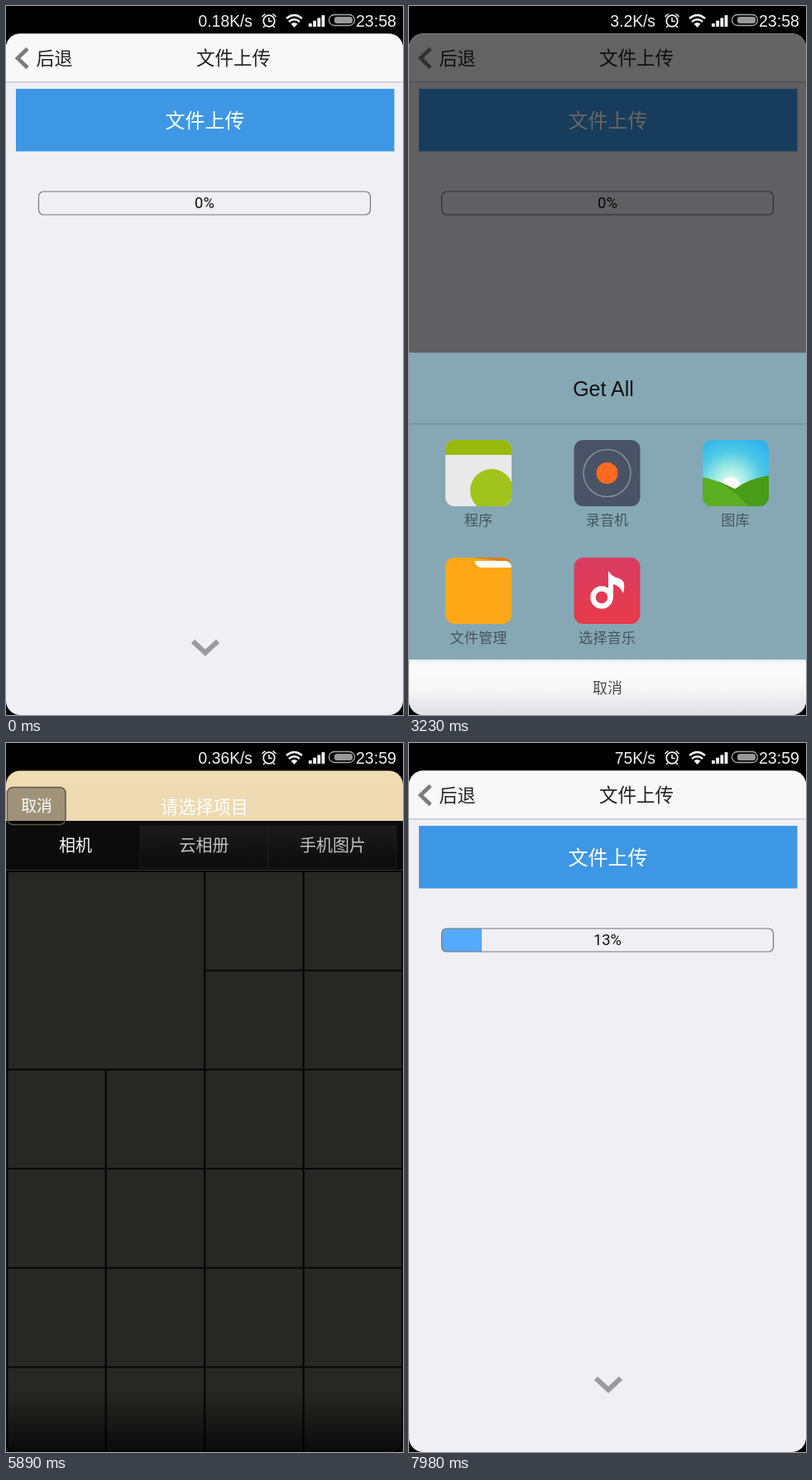
An HTML page that plays this animation: 480 px wide and 856 px high, repeating every 8000 ms.

```html
<!DOCTYPE html>
<html lang="zh">
<head>
<meta charset="utf-8">
<title>文件上传</title>
<style>
  html, body { margin: 0; width: 100%; height: 100%; overflow: hidden; background: #000; }
  svg { display: block; width: 100%; height: 100%; }
  text { font-family: "Liberation Sans", "Noto Sans CJK SC", "Noto Sans CJK", sans-serif; }
  .pct { font-family: Roboto, sans-serif; }
  .tab { font-family: "Noto Sans CJK SC", "Noto Sans CJK", sans-serif; font-weight: 500; }
</style>
</head>
<body>
<svg id="stage" viewBox="0 0 480 856"></svg>
<script>
const LOOP = 8000, STEP = 190;

const attrs = o => Object.entries(o).map(([k, v]) => `${k}="${v}"`).join(' ');
const rect = (x, y, w, h, fill, extra = {}) =>
  `<rect ${attrs({ x, y, width: w, height: h, fill, ...extra })}/>`;
const circle = (cx, cy, r, fill, extra = {}) => `<circle ${attrs({ cx, cy, r, fill, ...extra })}/>`;
const path = (d, fill, extra = {}) => `<path ${attrs({ d, fill, ...extra })}/>`;
const line = (d, stroke, width, extra = {}) =>
  path(d, 'none', { stroke, 'stroke-width': width, ...extra });
// Text placed by its middle height
const text = (s, x, cy, size, fill, extra = {}) =>
  `<text ${attrs({ x, y: cy + size * 0.37, 'font-size': size, fill, 'text-anchor': 'middle', ...extra })}>${s}</text>`;
const group = (id, body, extra = {}) => `<g ${attrs({ id, ...extra })}>${body}</g>`;
const stops = list => list.map(([o, c, a = 1]) =>
  `<stop offset="${o}" stop-color="${c}" stop-opacity="${a}"/>`).join('');
const gradient = (id, list) =>
  `<linearGradient id="${id}" x1="0" y1="0" x2="0" y2="1">${stops(list)}</linearGradient>`;
const glow = (id, cx, cy, r, list) =>
  `<radialGradient id="${id}" gradientUnits="userSpaceOnUse" ${attrs({ cx, cy, r })}>${stops(list)}</radialGradient>`;
const clip = (id, shape) => `<clipPath id="${id}">${shape}</clipPath>`;

function defs() {
  return '<defs>' +
    clip('screen', rect(0, 33.5, 480, 822.5, '#000', { rx: 17 })) +
    clip('home', rect(0, -20, 480, 876, '#000', { rx: 17 })) +
    clip('fill', rect(39.5, 224, 401, 28, '#000', { rx: 6 })) +
    clip('app', rect(44, 524, 80, 80, '#000', { rx: 11 })) +
    clip('pic', rect(355, 524, 80, 80, '#000', { rx: 11 })) +
    gradient('sky', [[0, '#12458c'], [.1, '#0d4896'], [.2, '#3f78ba'], [.3, '#bccbe0'], [.38, '#d3d4dc'],
      [.4, '#7f9cc4'], [.5, '#4b86c2'], [.66, '#1c68ba'], [.8, '#0d488f'], [.92, '#07296a'], [1, '#061d44']]) +
    gradient('cancel', [[0, '#e9eef0'], [.12, '#fcfcfc'], [.5, '#f7f7f8'], [1, '#e0e0e3']]) +
    glow('photoSky', 389, 577, 62, [[0, '#f4fffa'], [.3, '#a5ece4'], [.65, '#4cc8e6'], [1, '#2eb2ee']]) +
    gradient('rose', [[0, '#d83c62'], [1, '#e83a4a']]) +
    gradient('tan', [[0, '#f0dcb2'], [1, '#ecd9b2']]) +
    gradient('tab', [[0, '#1a1a1a'], [1, '#0c0c0c']]) +
    gradient('fade', [[0, '#000', 0], [1, '#000', .75]]) +
    gradient('paper', [[0, '#8d9097'], [.5, '#8b8c8f'], [1, '#77797d']]) +
    '</defs>';
}

function statusBar() {
  const white = '#f2f2f2';
  const bars = [0, 1, 2, 3].map(i => rect(366 + i * 5.2, 21 - i * 3.3, 3.8, 4 + i * 3.3, white)).join('');
  return text('', 298, 17.5, 19.3, white, { id: 'speed', 'text-anchor': 'end' }) +
    circle(318, 18, 6.8, 'none', { stroke: white, 'stroke-width': 1.8 }) +
    line('M318 14V18.5H322M309.5 13L313.5 9.5M326.5 13L322.5 9.5M313 24L311 26M323 24L325 26', white, 1.6) +
    line('M339 15Q348.500 7 358 15M342 19Q348.500 13.500 355 19', white, 2.5) +
    path('M348.500 26L344.500 21.500Q348.500 18.500 352.500 21.500Z', white) +
    bars +
    rect(390.5, 10.5, 31, 13, 'none', { rx: 6.5, stroke: '#aaa', 'stroke-width': 1.3 }) +
    rect(397, 13, 22, 8, '#999', { rx: 3 }) +
    text('', 472, 17.5, 19.6, white, { id: 'clock', 'text-anchor': 'end' });
}

function uploadPage() {
  return rect(0, 33, 480, 823, '#f0eff4') +
    rect(0, 33, 480, 58, '#f8f8f8') + rect(0, 91, 480, 1.4, '#c9c9cb') +
    line('M26 51.500L14 63L26 74.500', '#7c7c7c', 4.6) +
    text('后退', 58.5, 63, 22, '#222') +
    text('文件上传', 275, 63, 22.5, '#222') +
    rect(12, 100, 457.5, 75.5, '#3d97e4') +
    text('文件上传', 240.5, 138.5, 24, '#fff') +
    `<g clip-path="url(#fill)">${rect(39, 224, 0, 28, '#55aaff', { id: 'done' })}</g>` +
    rect(39.5, 224, 401, 28, 'none', { rx: 6, stroke: '#777', 'stroke-width': 1.2 }) +
    text('', 240, 237.5, 18.4, '#111', { id: 'percent', class: 'pct' }) +
    line('M226 767L241 781L256 767', '#9b9b9d', 6) +
    rect(0, 33, 480, 823, '#000', { id: 'dim' });
}

function sheet() {
  const label = (s, x, y) => text(s, x, y, 17.2, '#45565d');
  const tile = (x, y, fill) => rect(x, y, 80, 80, fill, { rx: 11 });
  const program = `<g clip-path="url(#app)">${rect(44, 524, 80, 80, '#e9e9ea')}${
    rect(44, 524, 80, 18, '#9bb80c')}${circle(100, 585, 26, '#a2c21c')}</g>`;
  const recorder = tile(199.5, 524, '#4a5365') +
    circle(239.5, 564, 28.5, 'none', { stroke: '#868c99', 'stroke-width': 1.6 }) +
    circle(239.5, 564, 13, '#ff6a22');
  const picture = `<g clip-path="url(#pic)">${rect(355, 524, 80, 80, 'url(#photoSky)')}${
    circle(389, 580, 11, '#fff')}${path('M355 569Q375 573 394 583Q412 570 435 567V604H355Z', '#489c18')}${
    path('M355 569Q385 574 410 604H355Z', '#5cae22')}</g>`;
  const folder = tile(44, 666, '#ffa817') +
    path('M76 666H113Q124 666 124 680L119 671Z', '#d97f16') +
    path('M79 670H117Q124 671 124 678H88Q82 678 79 670Z', '#fff');
  const music = tile(199.5, 666, 'url(#rose)') +
    circle(233, 714, 10.5, 'none', { stroke: '#fff', 'stroke-width': 6.5 }) +
    path('M241 682Q245 689 254 691Q263 694 259 709Q255 700 247 698V714H241Z', '#fff');
  return rect(0, 418.5, 480, 438, '#86a8b4') +
    text('Get All', 235, 461.5, 25, '#111') +
    rect(0, 504, 480, 1.2, '#708f96') +
    program + recorder + picture + folder + music +
    label('程序', 84, 621) + label('录音机', 239.5, 621) + label('图库', 394.5, 621) +
    label('文件管理', 84, 763) + label('选择音乐', 239.5, 763) +
    rect(0, 789, 480, 67, 'url(#cancel)') +
    text('取消', 240, 823, 18, '#4c4c4e');
}

function gallery() {
  const pitch = 119.5, top = 156;
  let tiles = rect(3, top, 236, 237, '#272826');
  for (let row = 0; row < 6; row++)
    for (let col = row < 2 ? 2 : 0; col < 4; col++)
      tiles += rect(2.5 + col * pitch, top + row * 119.7, 117, 117.5, '#272826');
  const rows = Array.from({ length: 7 }, (_, i) =>
    rect(120 - i * 9, 184 + i * 12, 90 - i * 37 % 40, 2.5, '#666a72', { opacity: .6 })).join('');
  const photos = rect(3, top, 236, 237, 'url(#paper)') +
    path('M3 156H18L30 393H3Z', '#4c4f55') + path('M222 156H239V393H212Z', '#676a6e') + rows +
    rect(241.5, top, 117, 117.5, '#898b8d') +
    circle(292, 211, 24, '#e8e6e0') +
    path('M241.500 200H256Q264 232 300 243V262H241.500Z', '#4a2522') +
    rect(241.5, 252, 117, 21.5, '#55504e');
  const check = circle(208, 360, 15.5, '#e98032', { stroke: '#eee', 'stroke-width': 2 }) +
    line('M200 360L206 366L217 354', '#fff', 4);
  const tabs = ['相机', '云相册', '手机图片'].map((s, i) =>
    rect(7 + i * 155, 100, 155, 51, i ? 'url(#tab)' : '#0b0b0b', { stroke: i ? '#1e1e1e' : 'none' }) +
    text(s, 84 + i * 155.5, 124, 20, i ? '#c2c2c2' : '#fff', { class: 'tab' })).join('');
  return rect(0, 33, 480, 823, '#0b0b0b') +
    rect(0, 33, 480, 61, 'url(#tan)') +
    tabs +
    line('M33 53L23 62L33 71', '#e4dccb', 4, { opacity: .55 }) +
    rect(1.5, 53.5, 70.5, 45, '#000', { rx: 7, 'fill-opacity': .33, stroke: '#5d5648', 'stroke-width': 1.5 }) +
    text('取消', 37, 76, 18.8, '#fff', { class: 'tab' }) +
    text('', 240, 77, 21.2, '#fff', { id: 'heading', class: 'tab' }) +
    rect(0, 153, 480, 703, '#080808') + rect(0, 153, 480, 1, '#303030') + tiles +
    group('photos', photos) + group('check', check) +
    rect(0, 780, 480, 76, 'url(#fade)');
}

function launcher() {
  const cols = [19, 166, 313, 460];
  const apps = [
    [['Tile Seven', '#f0a01e'], ['Mixoval', '#2b5ca5'], ['你找找', '#3ab2dc'], ['讲席', '#219c64']],
    [['Air Tether', '#e8f0f3'], ['Hover Fo...', '#a5c4a0'], ['36邻里', '#ff6820'], ['BoxFetcher', '#3e74bd']],
    [['FerryBox', '#303234'], ['NodeMist', '#3b9aca'], ['sousu', '#303234'], ['困了读书', '#43a5dc']],
    [['果林影音', '#43ad3e'], ['QVO', '#a4c62a'], ['风管家', '#4f9cc8'], ['三寸圃', '#16986c']],
    [['语通讯录', '#10ab20'], ['柏舟 Yo', '#328ada'], ['灵活近处', '#dedada'], ['Mixovals', '#dedada']],
    [['', '#76b925'], ['', '#dddfe2'], ['', '#eef2f6'], ['', '#ef7b1d']]
  ];
  const icons = apps.map((row, r) => row.map(([name, fill], c) => {
    const x = cols[c], y = r < 5 ? 2 + r * 168.2 : 881;
    const shape = name === 'QVO' ? circle(x, y, 33, fill) : rect(x - 52, y - 52, 104, 104, fill, { rx: 20 });
    const size = /^[a-z]/i.test(name) ? 24.4 : 22;
    const at = y + 75;
    return shape + text(name, x, at + 1.5, size, '#0a2040', { opacity: .6 }) + text(name, x, at, size, '#fff');
  }).join('')).join('');
  const dots = [0, 1, 2, 3].map(i => circle(202 + i * 25, 789, 5, i < 3 ? '#5f7da3' : '#fff')).join('');
  return rect(0, 0, 480, 856, 'url(#sky)') +
    path('M0 343Q30 333 60 344T130 341T220 350H330L380 344Q420 330 445 340T480 338V352H0Z', '#53668e') +
    icons + dots;
}

const stage = document.getElementById('stage');
const onScreen = { 'clip-path': 'url(#screen)' };
stage.innerHTML = defs() + rect(0, 0, 480, 856, '#000') +
  group('launcher', launcher(), { 'clip-path': 'url(#home)' }) +
  group('page', uploadPage(), onScreen) +
  `<g clip-path="url(#screen)">${group('sheet', sheet())}</g>` +
  group('window', rect(0, 0, 480, 856, '#05080c', { id: 'backing' }) + group('gallery', gallery(), onScreen)) +
  circle(0, 0, 14, '#fff', { id: 'touch', opacity: .22 }) +
  rect(0, 0, 480, 33, '#000', { id: 'band', opacity: .55 }) +
  statusBar();

const el = id => document.getElementById(id);
const set = (id, o) => { for (const k in o) el(id).setAttribute(k, o[k]); };
const show = (id, on) => set(id, { display: on ? 'inline' : 'none' });
const put = (id, s) => { el(id).textContent = s; };
const clamp = v => Math.max(0, Math.min(1, v));
const latest = (list, t) => list.filter(([from]) => t >= from).pop()[1];

const SPEEDS = [[0, '0.18K/s'], [1710, '3.2K/s'], [3420, '0.83K/s'], [5700, '0.36K/s'],
  [6460, '0.04K/s'], [7220, '75K/s']];

function draw(time) {
  const t = Math.floor(time % LOOP / STEP) * STEP;
  const during = (a, b) => t >= a && t < b;
  const closing = during(6840, 7030);
  const picking = during(5700, 7030);

  put('speed', latest(SPEEDS, t));
  put('clock', t < 3420 ? '23:58' : '23:59');
  show('launcher', closing);
  show('band', closing);
  show('page', !picking);

  const rise = clamp((t - 1520) / 380);
  const eased = 1 - (1 - rise) ** 2;
  show('sheet', during(1710, 5320));
  set('sheet', { transform: `translate(0 ${438 * (1 - eased)})` });
  set('dim', { opacity: t >= 5320 ? 0 : t >= 5130 ? .44 : .6 * eased });

  const pressed = during(1330, 1710), chosen = during(5130, 5320);
  show('touch', pressed || chosen);
  set('touch', pressed ? { cx: 250, cy: 138.5, r: 11 } : { cx: 412, cy: 574, r: 14 });

  const scale = closing ? .786 : 1;
  show('window', picking);
  show('backing', closing);
  set('window', {
    transform: `translate(240 428) scale(${scale}) translate(-240 -428)`,
    opacity: closing ? .6 : 1
  });
  show('photos', t >= 6080);
  show('check', t >= 6460);
  put('heading', t >= 6460 ? '已选择1项' : '请选择项目');

  const percent = Math.round(clamp((t - 7220) / 760) * 13);
  put('percent', percent + '%');
  set('done', { width: percent * 49 / 13 });
}

function tick(now) {
  draw(now);
  requestAnimationFrame(tick);
}
draw(0);
requestAnimationFrame(tick);
</script>
</body>
</html>
```
